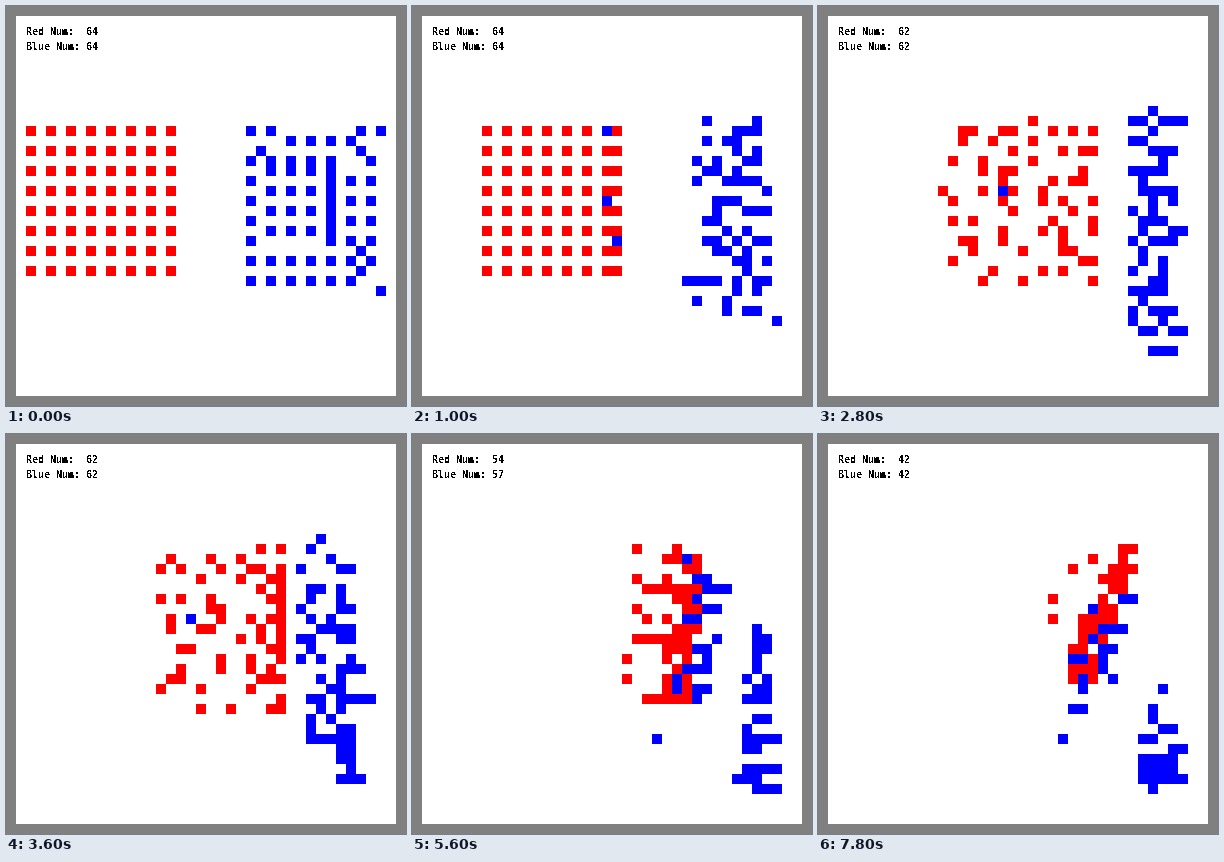
A matplotlib script for the animation above (8 s loop, 400x400 px).

```python
import numpy as np
import matplotlib.pyplot as plt
from matplotlib.animation import FuncAnimation

SIZE = 40            # cells per side, 10 px each
STEPS = 40
INTERVAL = 200
GATHERED, CONTACT, END = 14, 22, 39
RED, BLUE = (255, 0, 0), (0, 0, 255)

rng = np.random.default_rng(7)


def wander(n):
    """Slow seeded drift of n units: a function of the step."""
    phase = rng.uniform(0, 2 * np.pi, (2, n))
    return lambda step: 0.9 * np.sin(phase + 0.3 * step)


def grid(cols, rows):
    return [(c, r) for r in rows for c in cols]


def ramp(step, start, end):
    return float(np.clip((step - start) / (end - start), 0, 1))


def front(row, step):
    """Column of the battle line; it leans over as the fight goes on."""
    lean = ramp(step, CONTACT, END)
    return min(16 + 0.8 * step, 27) + lean * (1.5 + 0.35 * (19 - row))


def red_count(step):
    return round(np.interp(step, [5, 12, 19, 22, 28, 33, 39],
                           [64, 62, 62, 61, 54, 48, 42]))


def blue_count(step):
    return round(np.interp(step, [5, 12, 14, 22, 28, 33, 39],
                           [64, 63, 62, 62, 57, 51, 42]))


# Red: a square block marches right, loosens and piles up at the front
file_no, rank_no = np.tile(np.arange(8), 8), np.repeat(np.arange(8), 8)
red_drift = wander(64)
red_order = rng.permutation(64)


def red_cells(step):
    loose = ramp(step, 5, 12)
    dc, dr = loose * red_drift(step)
    march = np.interp(step, [0, 5, 22, 33], [0, 5, 17, 22])
    cols = np.rint(2 + 2 * file_no + march + dc).astype(int)
    rows = 12 + 2 * rank_no + loose * (file_no % 2 - 0.5) + dr
    rows = np.rint(rows).astype(int)
    limit, cells = {}, []
    for n in np.argsort(-cols, kind="stable"):
        if red_order[n] >= red_count(step):
            continue
        r = rows[n]
        c = min(cols[n], limit.get(r, round(front(r, step))))
        limit[r] = c - 1
        cells.append((c, r))
    return cells


# Blue: gathers into a column, then splits into fighters and reserves
blue_start = (grid([26, 28, 30], [15, 16, 18, 20, 22, 25, 27])
              + grid([24], range(15, 26, 2))
              + grid([32], [*range(15, 24), 25, 27])
              + grid([34], [13, *range(17, 28, 2)])
              + grid([36], range(15, 26, 2))
              + grid([35], [12, 14, 24, 26])
              + grid([28, 30, 32], [13])
              + [(26, 12), (25, 14), (37, 12), (37, 28)])

# Lone units: (last step, key steps, columns, rows)
loners = [(9, [0, 5], [24, 19], [12, 12]),
          (12, [0, 4], [24, 20], [23, 23]),
          (25, [0, 5, 14, 22], [24, 19, 18, 18], [19, 19, 18, 19]),
          (END, [0, 14, 22, 28], [24, 32, 27, 24], [27, 28, 27, 30])]
lone_starts = {(cols[0], rows[0]) for _, _, cols, rows in loners}
host = np.array(sorted(set(blue_start) - lone_starts, key=lambda p: p[1])).T
n_blue = host.shape[1]
index = np.arange(n_blue)
depth = index / (n_blue - 1)
column = np.array([32 + index % 3, 10 + 24 * depth])
fighter = index % 5 < 2
blue_drift = wander(n_blue)
blue_order = rng.permutation(n_blue)


def battle(step):
    top = np.interp(step, [22, 28, 39], [11, 13, 16])
    fight_row = top + (27.5 - top) * depth
    fight_col = front(fight_row, step) + index % 3 - ramp(step, CONTACT, END)
    top = np.interp(step, [22, 28, 33, 39], [14, 16, 20, 25])
    rest_row = top + (35 - top) * depth ** 0.6
    rest_col = 33.7 + (index % 4 - 1.5) * depth
    return np.array([np.where(fighter, fight_col, rest_col),
                     np.where(fighter, fight_row, rest_row)])


def blue_cells(step):
    cells = [(round(np.interp(step, keys, cols)),
              round(np.interp(step, keys, rows)))
             for last, keys, cols, rows in loners if step <= last]
    gather = ramp(step, 0, GATHERED) ** 0.75
    split = ramp(step, GATHERED, CONTACT)
    pos = host + (column - host) * gather
    pos = pos + (battle(max(step, CONTACT)) - pos) * split
    pos = np.rint(pos + gather * blue_drift(step)).astype(int)
    alive = blue_order < blue_count(step) - len(cells)
    for c, r in pos.T[alive]:
        r = min(r, 35)
        while (c, r) in cells:
            c += 1
        cells.append((min(c, 37), r))
    return cells


field = np.full((SIZE, SIZE, 3), 128, np.uint8)
field[1:-1, 1:-1] = 255

fig = plt.figure(figsize=(4, 4), dpi=100)
ax = fig.add_axes([0, 0, 1, 1])
ax.axis("off")
board = ax.imshow(field, extent=(0, 400, 400, 0), interpolation="nearest",
                  aspect="auto")


def label(y):
    return ax.text(20, y, "", family="DejaVu Sans Mono", weight="bold",
                   size=7.2, color="black", va="baseline", antialiased=False)


red_label, blue_label = label(29), label(44)


def draw(step):
    img = field.copy()
    for cells, color in ((red_cells(step), RED), (blue_cells(step), BLUE)):
        for c, r in cells:
            img[r, c] = color
    board.set_data(img)
    red_label.set_text(f"Red Num:  {red_count(step)}")
    blue_label.set_text(f"Blue Num: {blue_count(step)}")
    return board, red_label, blue_label


anim = FuncAnimation(fig, draw, frames=STEPS, interval=INTERVAL,
                     repeat=True, repeat_delay=0)
plt.show()
```
